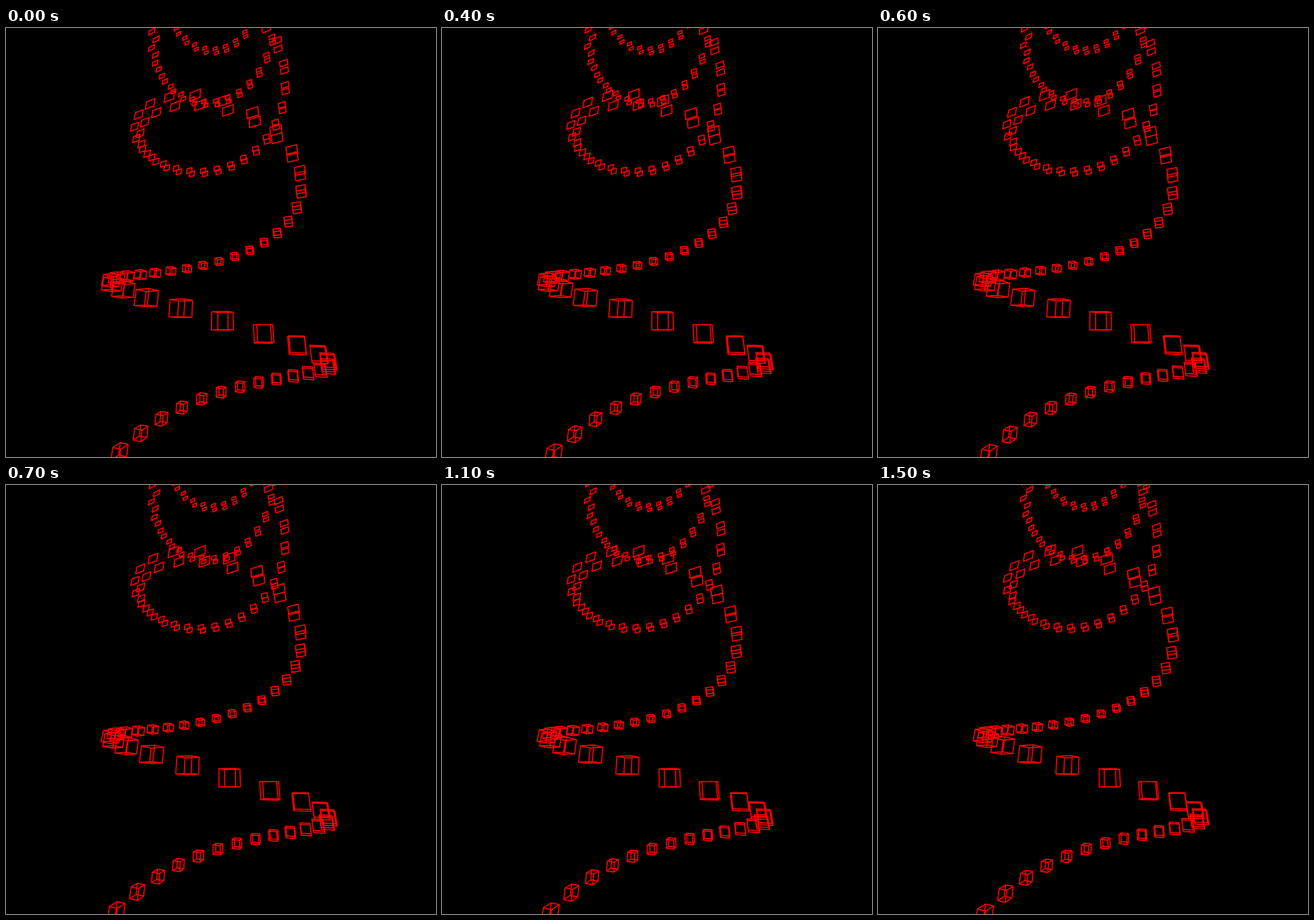
An HTML page with a canvas that plays this animation: 749 by 747 pixels, repeating every 8000 ms.

```html
<!DOCTYPE html>
<html lang="en">
<head>
<meta charset="utf-8">
<title>Cube helix</title>
<style>
  html, body { margin: 0; width: 100%; height: 100%; overflow: hidden; background: #000; }
  canvas { display: block; }
</style>
</head>
<body>
<canvas id="stage" width="749" height="747"></canvas>
<script>
const ctx = document.getElementById('stage').getContext('2d');
const LOOP = 8000, STEP = 100, STEPS = 15;

// World units: helix radius 10, camera at the origin.
const view = { x: 375.2, y: 372.8, focal: 383.7, pitch: 0.358 };
const helix = { x: -0.685, depth: 23.62, radius: 10, base: -11.696, rise: 0.7,
                turn: 0.25, phase: -7.4675, spin: -0.006, first: -4, last: 125 };
const cube = { side: 0.985, yaw: 0.349 };

const sinP = Math.sin(view.pitch), cosP = Math.cos(view.pitch);
const sinY = Math.sin(cube.yaw), cosY = Math.cos(cube.yaw);

function project(x, h, d) {
  const z = d * cosP + h * sinP;
  const up = h * cosP - d * sinP;
  return [view.x + view.focal * x / z, view.y - view.focal * up / z];
}

// Corner bits: 1 = right, 2 = top, 4 = back.
function corners(x, h, d) {
  return Array.from({ length: 8 }, (_, n) => {
    const [a, b, c] = [n & 1, n >> 1 & 1, n >> 2].map(bit => (bit - 0.5) * cube.side);
    return project(x + a * cosY + c * sinY, h + b, d - a * sinY + c * cosY);
  });
}

function edges(path, pts, bit) {
  for (let n = 0; n < 8; n++) {
    if (n & bit) continue;
    path.moveTo(...pts[n]);
    path.lineTo(...pts[n | bit]);
  }
}

function draw(step) {
  const solid = new Path2D(), faint = new Path2D();
  for (let i = helix.first; i <= helix.last; i++) {
    const a = helix.turn * i + helix.phase + helix.spin * step;
    const x = helix.x + helix.radius * Math.sin(a);
    const d = helix.depth + helix.radius * Math.cos(a);
    const h = helix.base + helix.rise * i;
    const pts = corners(x, h, d);
    edges(solid, pts, 1);
    edges(solid, pts, 2);
    edges(project(x, h, d)[1] < 260 ? faint : solid, pts, 4);
  }
  ctx.fillStyle = '#000';
  ctx.fillRect(0, 0, 749, 747);
  ctx.strokeStyle = '#f00';
  ctx.lineCap = 'round';
  ctx.lineWidth = 1.9;
  ctx.setLineDash([]);
  ctx.stroke(solid);
  ctx.lineCap = 'butt';
  ctx.lineWidth = 0.9;
  ctx.setLineDash([2, 2]);
  ctx.stroke(faint);
}

const start = performance.now();
function frame() {
  const t = (performance.now() - start) % LOOP;
  draw(Math.min(STEPS, Math.floor(t / STEP)));
  requestAnimationFrame(frame);
}
frame();
</script>
</body>
</html>
```
